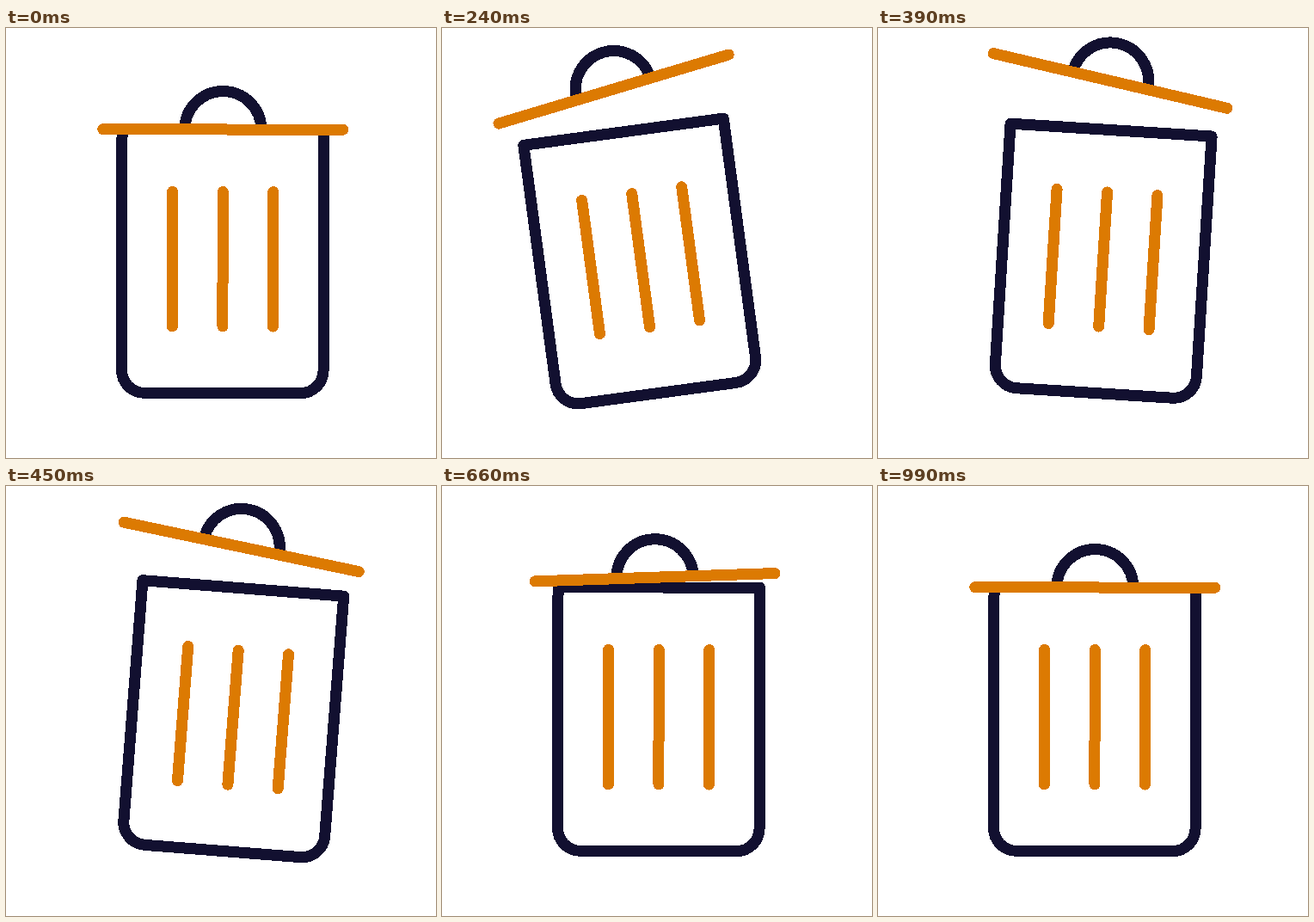
An HTML page for the animation above (1.05 s loop, 500 by 500 pixels).

```html
<!DOCTYPE html>
<html lang="en">
<head>
<meta charset="utf-8">
<title>Trash can</title>
<style>
  html, body { margin: 0; width: 100%; height: 100%; overflow: hidden; background: #fff; }
  svg { display: block; width: 100vw; height: 100vh; }
  path {
    fill: none; stroke-width: 13; stroke-linecap: round; stroke-linejoin: round;
    shape-rendering: crispEdges;
  }
  .dark { stroke: #121030; }
  .warm { stroke: #dc7a02; }
</style>
</head>
<body>
<svg viewBox="0 0 500 500">
  <g id="can">
    <path class="dark" d="M134.500 118H369V398a26.500 26.500 0 0 1-26.500 26.500H161a26.500 26.500 0 0 1-26.500-26.500Z"/>
    <path class="warm" d="M193.200 190.500V347M251.800 190.500V347M310.300 190.500V347"/>
    <g id="lid">
      <path class="dark" d="M207.300 118a44.500 44.500 0 0 1 89 0"/>
      <path class="warm" d="M112.200 118H391.200"/>
    </g>
  </g>
</svg>
<script>
const LOOP = 1050, STEP = 30, REST = 990;

// Turning points as [time, value]; the lid moves relative to the can
const tilt = [[0, .1], [135, -9.8], [174, -9.8], [436, 4.7], [545, .1]];
const lidTilt = [[0, 0], [145, -15], [160, -15], [405, 9.8], [570, -4.4], [760, .8], [960, 0]];
const shift = [[0, 0], [130, -5.8], [320, -4], [540, -7], [850, 0]];

const ease = u => (1 - Math.cos(Math.PI * Math.min(1, u))) / 2;

function swing(keys, t) {
  const next = keys.findIndex(k => k[0] > t);
  if (next < 0) return keys[keys.length - 1][1];
  const [t0, a] = keys[next - 1], [t1, b] = keys[next];
  return a + (b - a) * ease((t - t0) / (t1 - t0));
}

// The lid's hop: a bell curve, steeper on the way down, with a soft start
function lift(t) {
  const u = (t - 345) / (t < 345 ? 264 : 222);
  return Math.max(0, 60.2 / Math.cosh(u) ** 2 - .8) * ease(t / 100);
}

const can = document.getElementById('can'), lid = document.getElementById('lid');

function pose(t) {
  can.setAttribute('transform', `rotate(${swing(tilt, t)} 252 424)`);
  lid.setAttribute('transform',
    `translate(${swing(shift, t)} ${-lift(t)}) rotate(${swing(lidTilt, t)} 251.700 118)`);
}

const start = performance.now();
function tick() {
  const t = (performance.now() - start) % LOOP;
  pose(Math.min(REST, Math.floor(t / STEP) * STEP));
  requestAnimationFrame(tick);
}
tick();
</script>
</body>
</html>
```
